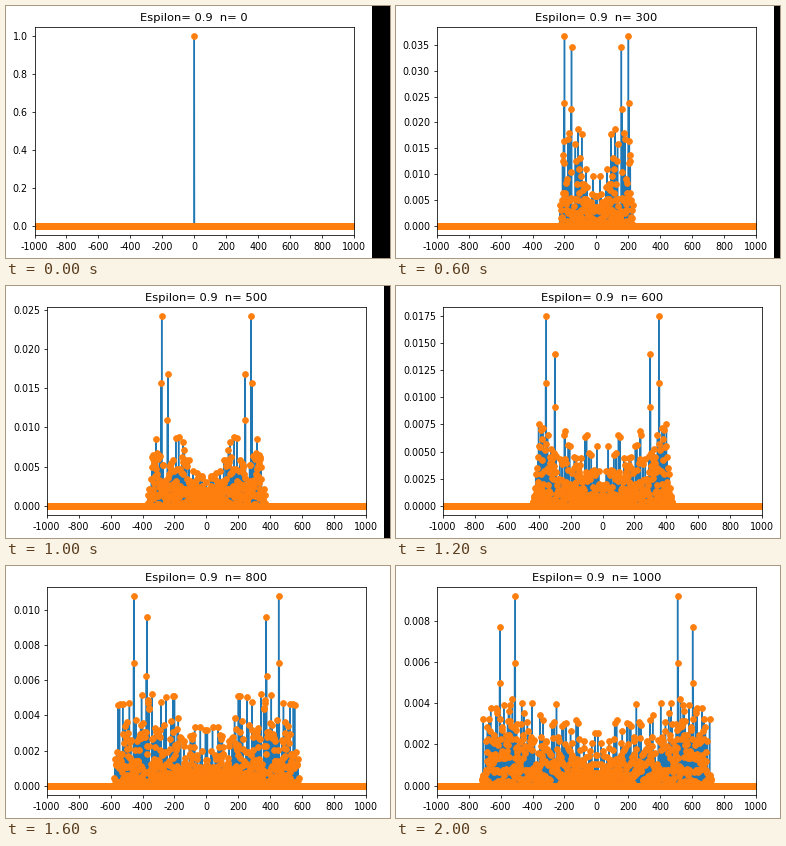
Animation, 384 px wide and 252 px high, one loop 2200 ms. Source, as a matplotlib script:

```python
import matplotlib.pyplot as plt
import numpy as np
from matplotlib.animation import FuncAnimation
from matplotlib.patches import Rectangle

W, H, DPI = 384, 252, 64
ZOOM = 0.9545                 # pixels per point
S = ZOOM * 72 / DPI           # size factor at this dpi
AX_W, AX_H, AX_BOTTOM = 319.6, 208.3, 22.9
DIGIT = 6.07                  # width of one tick label digit

plt.rcParams.update({
    "font.family": "DejaVu Sans",
    "font.size": 10 * S,
    "axes.titlesize": 12 * S,
    "axes.titlepad": 6 * S,
    "axes.linewidth": 0.8 * S,
    "axes.unicode_minus": False,
    "lines.linewidth": 1.5 * S,
    "lines.markersize": 6 * S,
    "lines.markeredgewidth": 1.0 * S,
})
for axis in ("xtick", "ytick"):
    plt.rcParams[axis + ".major.size"] = 3.5 * S
    plt.rcParams[axis + ".major.pad"] = 3.5 * S
    plt.rcParams[axis + ".major.width"] = 0.8 * S

# the two main peaks after every 100 steps: (distance, probability)
PEAKS = [
    [(0, 1.0)],
    [(62, 0.075), (54, 0.052)],
    [(128, 0.0489), (104, 0.0455)],
    [(200, 0.0367), (156, 0.0347)],
    [(244, 0.0290), (206, 0.0215)],
    [(280, 0.0242), (240, 0.0168)],
    [(352, 0.0175), (296, 0.0140)],
    [(412, 0.0126), (340, 0.0117)],
    [(452, 0.0108), (372, 0.0096)],
    [(466, 0.0165), (362, 0.0133)],
    [(508, 0.0092), (602, 0.0077)],
]
x = np.arange(-1000, 1001)


def distribution(i):
    """Symmetric speckle inside the light cone, with its main peaks."""
    half = np.zeros(1001)
    if i:
        rng = np.random.default_rng(i)
        edge = 70.5 * i + 18
        pos = np.arange(0, edge, 2, dtype=int)
        u = pos / edge
        env = (0.5 + 0.75 * u) * np.minimum(1, (1 - u) * 10)
        p = env * rng.exponential(1.15 / edge, pos.size)
        cap = 0.55 * PEAKS[i][1][1]
        half[pos] = np.where(p > cap, cap * rng.uniform(0.5, 1, pos.size), p)
        for d, v in PEAKS[i]:
            half[d + 4] = 0.65 * v      # shoulder beside each peak
    for d, v in PEAKS[i]:
        half[d] = v
    return np.concatenate([half[:0:-1], half])


DATA = [distribution(i) for i in range(len(PEAKS))]

fig = plt.figure(figsize=(W / DPI, H / DPI), dpi=DPI, facecolor="white")
ax = fig.add_axes([0.1, AX_BOTTOM / H, AX_W / W, AX_H / H])
line, = ax.plot(x, DATA[0], color="#1f77b4")
dots, = ax.plot(x, DATA[0], "o", color="#ff7f0e")
ax.set_xlim(-1000, 1000)
ax.set_xticks(range(-1000, 1001, 200))
strip = Rectangle((1, 0), 0, 1, transform=fig.transFigure,
                  facecolor="black", linewidth=0)
fig.add_artist(strip)


def scale_y(p):
    """Fit the y axis and return the decimals its tick labels need."""
    ax.set_ylim(-0.05 * p.max(), 1.05 * p.max())
    low, high = ax.get_yticks()[:2]
    return len(f"{high - low:.4g}") - 2


DECIMALS = [scale_y(p) for p in DATA]


def draw(i):
    p = DATA[i]
    line.set_ydata(p)
    dots.set_ydata(p)
    scale_y(p)
    left = 28.5 + DIGIT * (DECIMALS[i] - 1)
    ax.set_position([left / W, AX_BOTTOM / H, AX_W / W, AX_H / H])
    ax.set_title(f"Espilon= 0.9  n= {100 * i}")
    # the uncovered margin only shrinks during the loop
    seen = 1 - 6 * (4 - max(DECIMALS[:i + 1])) / W
    strip.set_x(seen)
    strip.set_width(1 - seen)
    return line, dots, strip


anim = FuncAnimation(fig, draw, frames=len(PEAKS), interval=200,
                     repeat=True, blit=False)
plt.show()
```
